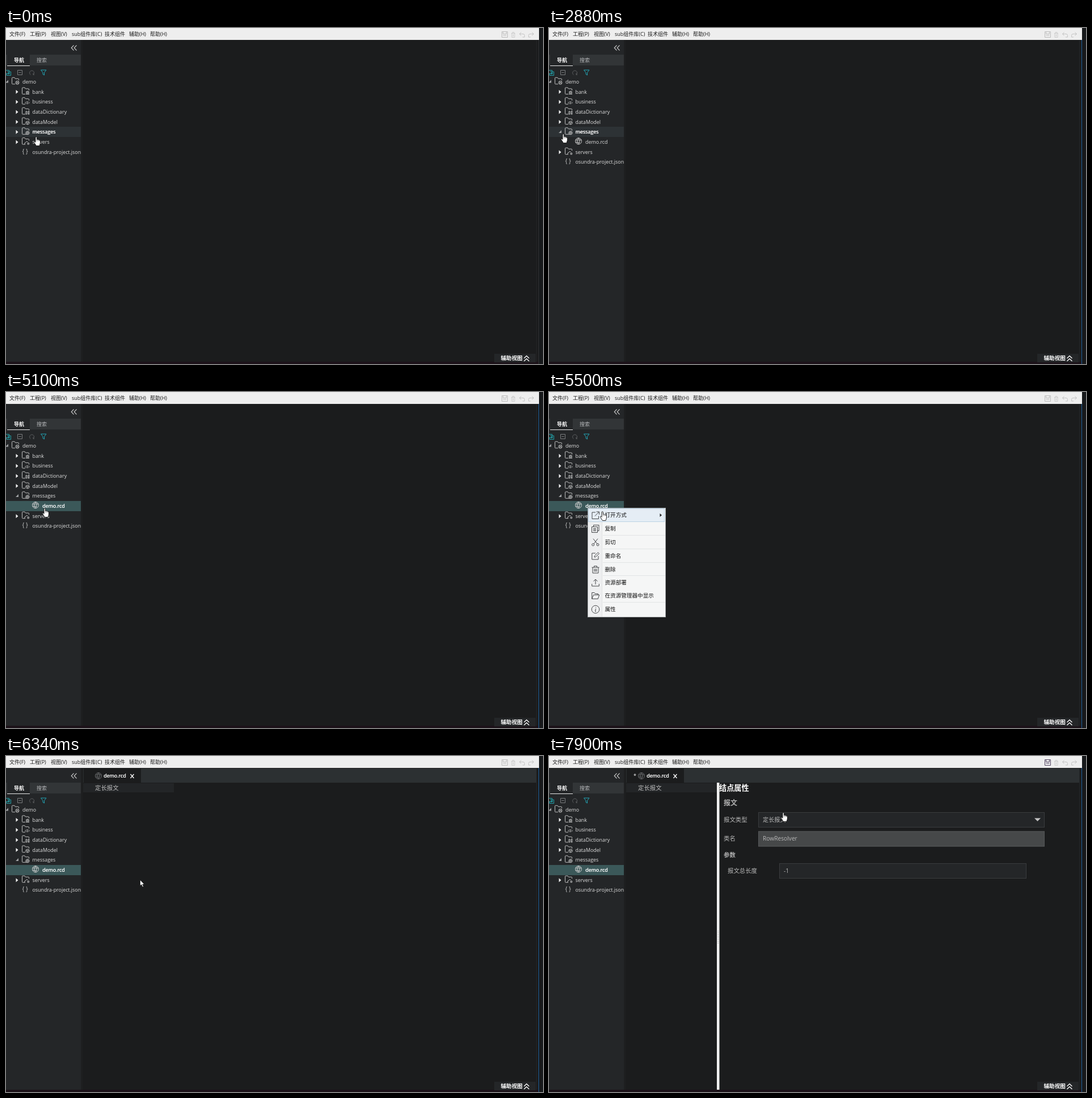
Animation, 947 px wide and 592 px high, one loop 8 s. Source, as an HTML page with a canvas:

```html
<!DOCTYPE html>
<html lang="zh-CN">
<head>
<meta charset="utf-8">
<style>
html, body { margin: 0; width: 100%; height: 100%; overflow: hidden; background: #1b1c1d; }
canvas { display: block; }
</style>
</head>
<body>
<canvas id="stage" width="947" height="592"></canvas>
<script>
const ctx = document.getElementById('stage').getContext('2d');
const LOOP = 8000, ROW = 17.7;
const FONT = '"Open Sans", "Noto Sans CJK SC", "Noto Sans CJK", sans-serif';

// Pointer stops: start time, left, top, shape (hand or arrow)
const pointerStops = [
  [0, 49, 191, 'h'], [1000, 86, 214, 'h'], [1120, 116, 238, 'a'], [1270, 118, 241, 'a'],
  [1390, 120, 243, 'a'], [1850, 108, 238, 'a'], [2000, 66, 218, 'h'], [2150, 60, 203, 'h'],
  [2270, 57, 188, 'h'], [2420, 22, 187, 'h'], [2580, 21, 186, 'h'], [4160, 22, 186, 'h'],
  [4310, 30, 189, 'h'], [4430, 44, 195, 'h'], [4550, 57, 201, 'h'], [4670, 64, 204, 'h'],
  [5500, 90, 210, 'h'], [5620, 140, 215, 'h'], [5740, 177, 217, 'h'], [5890, 227, 217, 'h'],
  [6040, 232, 217, 'h'], [6340, 236, 218, 'a'], [6610, 243, 180, 'a'], [6730, 254, 130, 'a'],
  [6850, 261, 88, 'a'], [7000, 260, 83, 'a'], [7150, 225, 70, 'a'], [7270, 162, 51, 'h'],
  [7390, 174, 51, 'h'], [7540, 215, 47, 'h'], [7660, 290, 60, 'a'], [7780, 372, 90, 'h'],
  [7900, 409, 99, 'h']
];

const GLOBE = 'M.5 6a5.5 5.5 0 1 0 11 0a5.5 5.5 0 1 0-11 0M1 4H11M1 8H8M6 .5Q1.5 6 6 11.5M6 .5Q10.5 6 6 11.5';
const FOLDER = 'M6 12H1.5Q.5 12 .5 11V1.5Q.5.5 1.5.5H5L6.5 2.5H11.5Q12.5 2.5 12.5 3.5V5.5';
const badges = {
  demo: 'M7 9.5a3 3 0 1 0 6 0a3 3 0 1 0-6 0M8 8L12 11M12 8L8 11',
  bank: 'M7 8.5L10 6.5L13 8.5ZM7 12H13M8 9V12M10 9V12M12 9V12',
  business: 'M8 7.5L6 9.5L8 11.5M11 7.5L13 9.5L11 11.5M9.5 7V12',
  dataDictionary: 'M7 7H9V12H7ZM11 7H13V9H11ZM11 10.5H13V12H11Z',
  dataModel: 'M10 6.5L13 8V11L10 12.5L7 11V8ZM7 8L10 9.5L13 8M10 9.5V12.5',
  messages: 'M7 9.5a3 3 0 1 0 6 0a3 3 0 1 0-6 0M7 9.5H13M10 6.5V12.5M6 11.5L8 12.5',
  servers: 'M5 12Q4 9 7 8.5Q8 5.5 10.5 7.5M10 12V9.5H12.5V12Z'
};
const menuItems = [
  ['打开方式', 217, 'M7 1.5H1V13H12.5V8M8.5.5H13.5V5.5M13.5.5L6 8'],
  ['复制', 240.5, 'M3.5 3V.5H13V10.5H11M.5 3.5H10.5V13.5H.5ZM3 6.5H8M3 8.5H8M3 10.5H8'],
  ['剪切', 264.5, 'M3 .5L10 9.5M11 .5L4 9.5M.7 11a2 2 0 1 0 4 0a2 2 0 1 0-4 0M9 11a2 2 0 1 0 4 0a2 2 0 1 0-4 0'],
  ['重命名', 288.5, 'M7 2H.8V13H12V7M5 9L5.5 6.5L11.5.7L13.5 2.6L7.5 8.5Z'],
  ['删除', 312.5, 'M.5 3H13.5M4.5 3V.7H9.5V3M2 3V13H12V3M5 5.5V10.5M7 5.5V10.5M9 5.5V10.5'],
  ['资源部署', 335.5, 'M.7 9V13H13.3V9M7 10V1M3.5 4.5L7 1L10.5 4.5'],
  ['在资源管理器中显示', 358.5, 'M.7 12.5V1.5H5L6.5 3.5H11.5V5.5M.7 12.5L3.5 5.5H13.7L11.3 12.5Z'],
  ['属性', 382.5, 'M.2 7a6.8 6.8 0 1 0 13.6 0a6.8 6.8 0 1 0-13.6 0M7.5 5.8L6.5 10.5H8M7.6 3.2V4.2']
];

function rect(x, y, w, h, fill, border) {
  ctx.fillStyle = fill;
  ctx.fillRect(x, y, w, h);
  if (border) {
    ctx.strokeStyle = border;
    ctx.lineWidth = 1;
    ctx.strokeRect(x + .5, y + .5, w - 1, h - 1);
  }
}

function text(s, x, middle, size, color, weight = 400) {
  ctx.font = `${weight} ${size}px ${FONT}`;
  ctx.fillStyle = color;
  ctx.fillText(s, x, middle + size * .36);
}

// Emphasis that keeps the regular letter widths
function strong(s, x, middle, size, color) {
  text(s, x, middle, size, color);
  text(s, x + .4, middle, size, color);
}

function shape(d, x, y, stroke, fill, width = 1) {
  const path = new Path2D(d);
  ctx.save();
  ctx.translate(x, y);
  if (fill) { ctx.fillStyle = fill; ctx.fill(path); }
  if (stroke) { ctx.strokeStyle = stroke; ctx.lineWidth = width; ctx.stroke(path); }
  ctx.restore();
}

function drawFrame(t) {
  rect(0, 0, 947, 592, '#1b1c1d');
  rect(0, 0, 940, 21, '#eeeeee');
  const titles = [['文件(F)', 6], ['工程(P)', 42], ['视图(V)', 79], ['sub组件库(C)', 116],
    ['技术组件', 174], ['辅助(H)', 217], ['帮助(H)', 254]];
  for (const [s, x] of titles) text(s, x, 10.5, 9, '#1a1a1a');

  const save = t >= 6460 ? '#514360' : '#bdbdbd';
  shape('M.5.5H10.5V10.5H.5ZM2.5.5V4.5H8.5V.5M2.5 7H8.5', 874, 6, save);
  shape('M0 2.5H7M2 2.5V.5H5V2.5M1 2.5V9.5H6V2.5M3.5 4V8', 891, 7, '#cccccc');
  shape('M3.5.5L.5 3.5L3.5 6.5M.5 3.5H7Q9.5 3.5 9.5 6.5V9H6', 905, 7, '#c4c4c4');
  shape('M6.5.5L9.5 3.5L6.5 6.5M9.5 3.5H3Q.5 3.5.5 6.5V9H4', 921, 7, '#c4c4c4');

  rect(940, 0, 7, 592, '#17191b');
  rect(939, 21, 1, 571, t >= 2730 ? '#1d5f9c' : '#303234');
  rect(935, 22, 1, 566, '#232425');
}

function drawSidebar(t, px, py) {
  rect(0, 21, 132, 567, '#242628');
  rect(132, 21, 3, 567, '#1e1f20');
  shape('M5 .5L.7 5L5 9.5M10 .5L5.7 5L10 9.5', 114.5, 30, '#c8c8c8', null, 1.1);
  rect(0, 47, 132, 19, '#323537');
  rect(2, 47, 40, 19, '#242628');
  rect(2, 66, 40, 1, '#e8e8e8');
  text('导航', 14, 57, 9, '#ffffff', 700);
  text('搜索', 54, 57, 9, '#b4b6b8');

  shape('M-2 .5H5.5V6.5H-2M2 3H8.5V9.5H1V6M3 6H7M5 4V8', 0, 74, '#20a0a8');
  shape('M.5.5H8.5V8.5H.5ZM2.5 4.5H6.5', 20, 74, '#7b7d7f');
  shape('M2.5 8.5A4 4 0 1 1 7 8.3M7 8.3V5.5M7 8.3H9', 41, 74, '#5c5e60');
  shape('M.5.5H10L6.5 5V9.5L4 8V5Z', 61, 73.5, '#22a7b8');

  const expanded = t >= 2880, selected = t >= 5100;
  const names = ['demo', 'bank', 'business', 'dataDictionary', 'dataModel', 'messages', 'servers', 'osundra-project.json'];
  if (expanded) names.splice(6, 0, 'demo.rcd');
  const hover = px < 132 && t < 5500 ? Math.floor((py - 85.7) / ROW) : -1;

  names.forEach((name, i) => {
    const y = 94.6 + i * ROW, leaf = name === 'demo.rcd', json = name.endsWith('json');
    const active = leaf && selected, top = Math.round(y - 8.8);
    if (active) rect(0, top, 132, 18, '#3b5859');
    else if (i === hover && !json) rect(0, top, 132, 18, '#2d3235');

    const root = i === 0, textX = root ? 29 : leaf ? 64 : 46.5;
    if (leaf) shape(GLOBE, 46, y - 7.5, '#d0d0d0');
    else if (json) text('{ }', 28.5, y - 1.5, 10, '#c8c8c8');
    else {
      shape(FOLDER + badges[name], root ? 10 : 28, y - 7.8, '#c8c8c8', null, .95);
      if (root || name === 'messages' && t >= 2730) shape('M5 0V5H0Z', root ? -1 : 17, y - 3, null, '#a0a2a4');
      else shape('M0 0L4 3.5L0 7Z', 17.5, y - 3.3, null, '#f0f0f0');
    }
    if (active || i === hover) strong(name, textX, y, 8.9, '#ffffff');
    else text(name, textX, y, 8.9, '#dedede');
  });
}

function drawField(x, y, w, label, fill = '#242628', border = '#3a3c3e') {
  rect(x, y, w, 27, fill, border);
  text(label, x + 8, y + 13, 10.2, '#b8b8b8');
}

function drawEditor(t) {
  rect(136, 22, 799, 25, '#2c3032');
  rect(137, 22, 101, 25, '#1b1c1d');
  if (t >= 6610) text('*', 149, 35, 9, '#ffffff');
  shape(GLOBE, 157, 29, '#66686a');
  strong('demo.rcd', 172, 35, 8.9, '#ffffff');
  shape('M0 0L6 7M6 0L0 7', 219.5, 32, '#ffffff', null, 1.3);
  rect(136, 48, 160, 16, '#232527');
  text('定长报文', 157, 56.5, 10.4, '#bcbcbc');
  if (t < 6460) return;

  rect(296, 47, 4.5, 541, '#f1f1f1');
  for (let y = 308; y < 332; y += 3) rect(297, y, 2.5, 1, '#bdbdbd');
  text('结点属性', 300, 56.5, 13.2, '#ffffff', 700);
  text('报文', 308, 83, 12, '#b0b0b0', 700);
  text('报文类型', 308, 112, 10.4, '#b8b8b8');
  drawField(369, 99, 505, '定长报文');
  shape('M0 0H11L5.5 5.5Z', 856, 109.5, null, '#c4c4c4');
  text('类名', 308, 145.5, 10.4, '#b8b8b8');
  drawField(369, 132.5, 505, 'RowResolver', '#464849', '#555759');
  text('参数', 308, 174, 10.4, '#b0b0b0', 700);
  text('报文总长度', 315, 202.5, 10.4, '#b8b8b8');
  drawField(406, 189, 436, '-1');
}

function drawMenu(t) {
  rect(68, 204, 138, 193, '#f5f6f6', '#a4a8aa');
  rect(69, 205, 24, 191, '#eeeff0');
  rect(93, 205, 1, 191, '#dfe1e2');
  rect(69, 205, 135, 24, '#e5edf5', '#bcd3e4');
  for (const y of [252, 276, 300, 323, 370]) rect(95, y, 110, 1, '#e2e4e5');
  for (const [label, y, icon] of menuItems) {
    shape(icon, 75, y - 6.5, '#444648');
    text(label, 98.5, y, 9.6, '#111111');
  }
  shape('M0 0L3.5 3L0 6Z', 195.5, 214, null, '#222222');
  if (t < 5740) return;

  rect(204, 205, 98, 50, '#f5f6f6', '#a4a8aa');
  rect(205, 206, 23, 48, '#eeeff0');
  if (t >= 5890) rect(205, 206, 96, 25, '#e5edf5', '#bcd3e4');
  ['RCD编辑器', '文本编辑器'].forEach((label, i) => {
    const y = 218.5 + i * 23;
    shape('M1 3V.5H9V3M5 .5V9M3 9H7M0 12.5H10', 211.5, y - 6.5, '#444648', null, 1.1);
    text(label, 233.5, y, 9.6, '#111111');
  });
}

function drawPointer(x, y, kind) {
  if (kind === 'a') {
    shape('M0 0V10.5L2.4 8.3L4.2 12.5L6 11.7L4.2 7.7H7.5Z', x + .5, y + .3, '#111111', '#ffffff', .7);
    return;
  }
  shape('M3 1.4Q4.2 0 5.4 1.4V5.5Q6.7 4.7 7.4 6Q8.7 5.3 9.4 6.6Q11.4 6.4 11.4 8.2V12L10 16.5H4.4L.5 10.5Q.4 8.7 1.9 9.2L3 10.4Z',
    x, y, '#111111', '#ffffff', .9);
  shape('M5.4 6V8.5M7.4 6.5V8.5M9.4 7V8.5', x, y, '#444444', null, .6);
}

function render() {
  const t = performance.now() % LOOP;
  const [, px, py, kind] = pointerStops.findLast(stop => stop[0] <= t);
  drawFrame(t);
  drawSidebar(t, px, py);
  if (t >= 6340) drawEditor(t);
  rect(0, 588, 939, 4, '#1c1219');
  rect(861, 574, 73, 15, '#242628');
  text('辅助视图', 872.5, 582, 9.6, '#ffffff', 700);
  shape('M.5 5L5 .7L9.5 5M.5 10L5 5.7L9.5 10', 913, 577, '#ffffff', null, 1.3);
  if (t >= 5500 && t < 6190) drawMenu(t);
  drawPointer(px, py, kind);
  requestAnimationFrame(render);
}
render();
</script>
</body>
</html>
```
